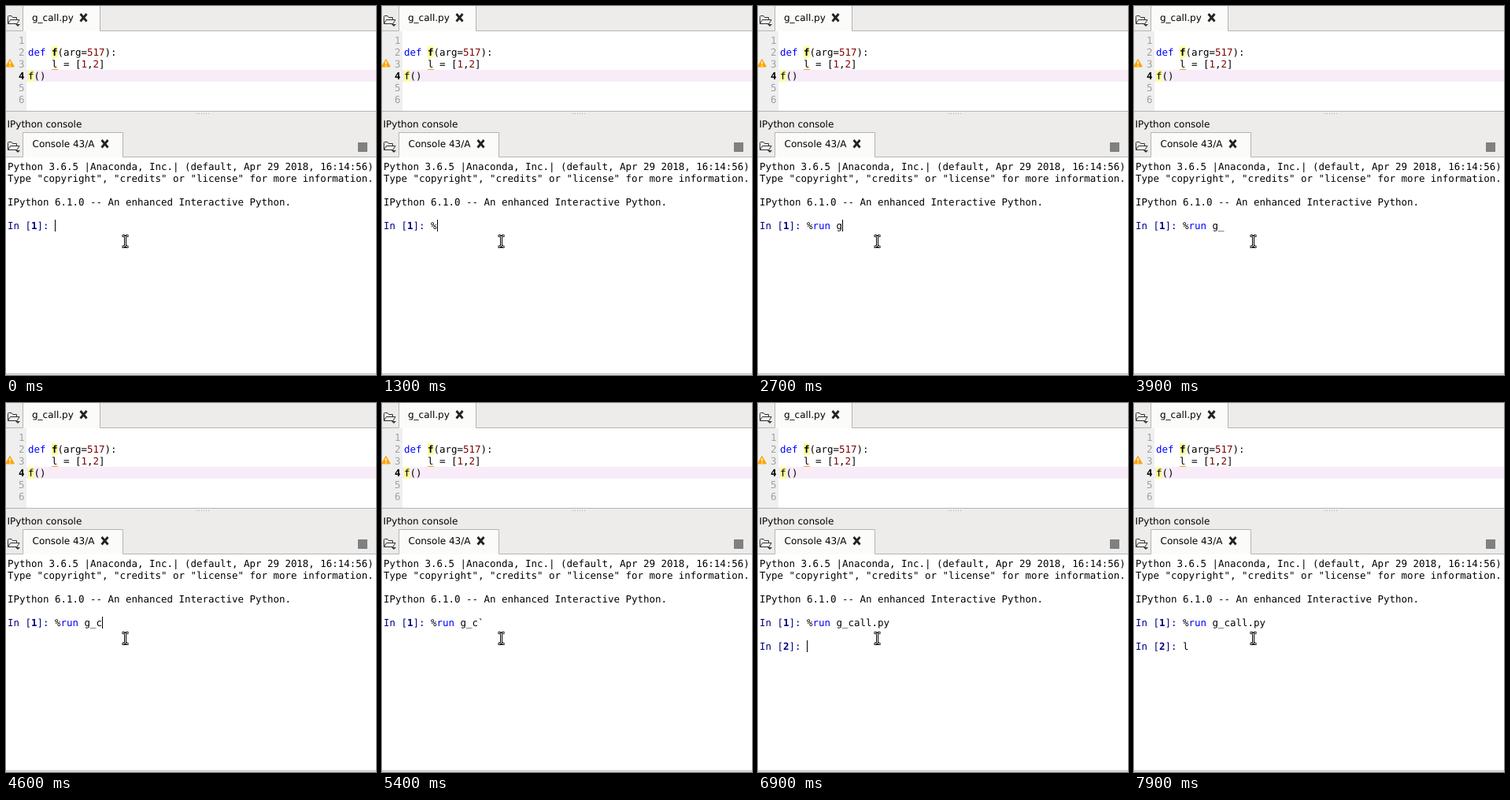
An HTML page for the animation above (8 s loop, 470x468 px).

```html
<!DOCTYPE html>
<html>
<head>
<meta charset="utf-8">
<style>
  html, body { margin: 0; width: 100%; height: 100%; overflow: hidden; background: #edeceb; }
  svg { display: block; }
  text { white-space: pre; text-rendering: geometricPrecision; }
  .ui { font: 12px "DejaVu Sans", sans-serif; }
  .code { font: 12.46px "DejaVu Sans Mono", monospace; }
  .num { fill: #a0a0a0; }
  .kw { fill: #00f; }
  .lit { fill: #800000; }
  .prompt { fill: #000080; }
  .b { font-weight: bold; }
</style>
</head>
<body>
<svg width="470" height="468" viewBox="0 0 470 468">
  <defs>
    <g id="folder" fill="none" stroke="#333">
      <path d="M2.5 11.5V2.5Q2.5 1.5 3.5 1.5H7L8.5 3.5H13.5V6M2.5 11.5L5.5 6.5H17L14 11.5Z"/>
      <path d="M12 12h6l-3 3z" fill="#333" stroke="none"/>
    </g>
    <path id="close" d="M1.5 1L9.5 10.5M9.5 1L1.5 10.5" fill="none" stroke="#222" stroke-width="2.8"/>
  </defs>

  <!-- editor -->
  <path d="M0 31.5H21.5V0H119.5V31.5H470" fill="none" stroke="#b8b5b2"/>
  <rect x="22" width="97" height="32" fill="#fbfbfa"/>
  <use href="#folder" y="11"/>
  <text class="ui" x="33" y="19">g_call.py</text>
  <use href="#close" x="93" y="9"/>
  <rect y="32" width="470" height="101" fill="#fff"/>
  <rect y="32" width="26" height="101" fill="#efefef"/>
  <rect x="26" y="81" width="444" height="15" fill="#f7ecf8"/>
  <path d="M58 51h7.5v15H58zM28 81h7.5v15H28z" fill="#ff9"/>
  <path d="M0 133.5H470" stroke="#b8b5b2"/>
  <g class="code">
    <g class="num">
      <text x="16" y="48">1</text>
      <text x="16" y="63">2</text>
      <text x="16" y="78">3</text>
      <text class="b" x="16" y="93" fill="#000">4</text>
      <text x="16" y="108">5</text>
      <text x="16" y="123">6</text>
    </g>
    <text x="28" y="63"><tspan class="kw">def</tspan> <tspan class="b">f</tspan>(arg=<tspan class="lit">517</tspan>):</text>
    <text x="58" y="78">l = [<tspan class="lit">1</tspan>,<tspan class="lit">2</tspan>]</text>
    <text x="28" y="93">f()</text>
  </g>
  <path d="M58 80.5h8" stroke="#f5a623"/>
  <path d="M5 67.5L10.5 77H-.5Z" fill="#ffa500" stroke="#ffa500" stroke-linejoin="round"/>
  <path d="M5 70v4M5 75v1.5" stroke="#fff" stroke-width="1.4"/>

  <!-- console -->
  <path d="M242 136.5h17" stroke="#aaa" stroke-dasharray="1 2"/>
  <text class="ui" x="1.5" y="154">IPython console</text>
  <path d="M0 191.5H21.5V160.5H148.5V191.5H470" fill="none" stroke="#b8b5b2"/>
  <rect x="22" y="161" width="126" height="31" fill="#fbfbfa"/>
  <use href="#folder" y="171"/>
  <text class="ui" x="33.5" y="179">Console 43/A</text>
  <use href="#close" x="120" y="169"/>
  <rect id="stop" x="447" y="173" width="12" height="12"/>
  <rect y="192" width="470" height="274" fill="#fff"/>
  <path d="M0 466.5H470" stroke="#b8b5b2"/>
  <g class="code">
    <text x="2" y="208">Python 3.6.5 |Anaconda, Inc.| (default, Apr 29 2018, 16:14:56)</text>
    <text x="2" y="223">Type "copyright", "credits" or "license" for more information.</text>
    <text x="2" y="253">IPython 6.1.0 -- An enhanced Interactive Python.</text>
    <text class="prompt" x="2" y="283">In [<tspan class="b">1</tspan>]:</text>
    <text x="62" y="283"><tspan id="percent"></tspan><tspan id="magic" class="kw"></tspan><tspan id="rest"></tspan></text>
    <g id="second">
      <text class="prompt" x="2" y="313">In [<tspan class="b">2</tspan>]:</text>
      <text id="entry" x="62" y="313"></text>
    </g>
  </g>
  <rect id="caret" width="1" height="15"/>

  <!-- mouse pointer -->
  <g fill="none">
    <path id="beam" d="M147.5 291.5H150L151.5 293L153 291.5H155.5M151.5 293V303.5M147.5 305.5H150L151.5 303.5L153 305.5H155.5" stroke="#000" stroke-width="3"/>
    <path d="M148 291.5H150L151.5 293L153 291.5H155M151.5 293V303.5M148 305.5H150L151.5 303.5L153 305.5H155" stroke="#fff"/>
  </g>
</svg>
<script>
  const LOOP = 8000, RUN = 6800, NEXT = 6900, ENTRY = 7900;
  const $ = id => document.getElementById(id);

  // command line after each key press
  const keys = [
    [0, ''], [500, '%'], [1400, '%r'], [1500, '%ru'], [1700, '%run'], [1900, '%run '],
    [2700, '%run g'], [3500, '%run g_'], [4600, '%run g_c'], [5100, '%run g_c`'],
    [5700, '%run g_c'], [6300, '%run g_call.py']
  ];
  // the caret shows on a key press or blink and hides on the next blink
  const shows = [0, 500, 1300, 1700, 1900, 2700, 3400, 4400, 4600, 5100, 5700, 6300, NEXT];
  const hides = [300, 800, 1800, 2300, 2900, 3900, 4900, 5400, 5900, 6400, 7400];
  const last = (times, t) => Math.max(-1, ...times.filter(v => v <= t));

  function draw(now) {
    const t = now % LOOP;
    const line = keys.filter(k => k[0] <= t).pop()[1];
    const second = t >= NEXT;
    const entry = t >= ENTRY ? 'l' : '';

    $('percent').textContent = line.slice(0, 1);
    $('magic').textContent = line.slice(1, 4);
    $('rest').textContent = line.slice(4);
    $('entry').textContent = entry;
    $('second').style.display = second ? '' : 'none';
    $('stop').setAttribute('fill', t >= RUN && t < NEXT ? '#8b0000' : '#808080');

    const caret = $('caret');
    caret.setAttribute('x', Math.round(62 + 7.5 * (second ? entry : line).length));
    caret.setAttribute('y', second ? 301 : 271);
    caret.style.display = last(shows, t) > last(hides, t) ? '' : 'none';
  }

  const start = performance.now();
  function tick() {
    draw(performance.now() - start);
    requestAnimationFrame(tick);
  }
  draw(0);
  requestAnimationFrame(tick);
</script>
</body>
</html>
```
